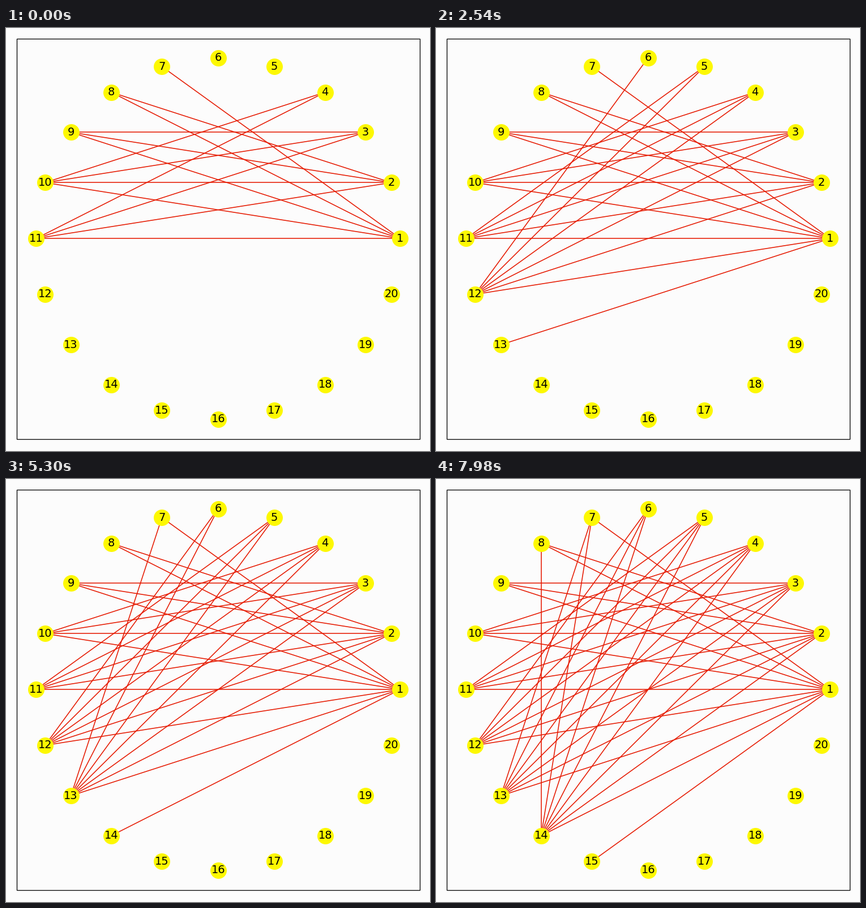
These frames come from a looping animation (749x748 px, 8 s). A matplotlib script:

```python
import numpy as np
import matplotlib.pyplot as plt
from matplotlib.animation import FuncAnimation
from matplotlib.collections import LineCollection
from matplotlib.patches import Rectangle

W, H, DPI = 749, 748, 100
PX = 72 / DPI                # points per pixel
CX, CY, RX, RY = 374.8, 372.2, 321.6, 319.7
NODES, GAP = 20, 6
START = 14                   # edges present at time zero
STEP, LEAD = 7.4, 4.6        # ticks per new edge, ticks already elapsed
TICK = 20
FRAMES = 400

BACK, YELLOW, RED = "#fcfcfc", "#fdf802", "#e61c04"

angle = 2 * np.pi * np.arange(NODES) / NODES
points = np.column_stack([CX + RX * np.cos(angle), CY - RY * np.sin(angle)])

# Join every pair at least GAP apart around the ring, row by row.
edges = [
    (points[i], points[j])
    for j in range(NODES)
    for i in range(j)
    if GAP <= j - i <= NODES - GAP
]

fig = plt.figure(figsize=(W / DPI, H / DPI), dpi=DPI, facecolor=BACK)
ax = fig.add_axes([0, 0, 1, 1])
ax.set_xlim(0, W)
ax.set_ylim(H, 0)
ax.axis("off")

ax.add_patch(Rectangle((18.5, 18.5), 712, 708, fill=False,
                       edgecolor="black", linewidth=1.3 * PX))
lines = LineCollection([], colors=RED, linewidths=1.6 * PX, zorder=2)
ax.add_collection(lines, autolim=False)
ax.scatter(points[:, 0], points[:, 1], s=(29 * PX) ** 2, c=YELLOW,
           linewidths=0, zorder=3)
for n, (x, y) in enumerate(points, 1):
    ax.text(x, y, str(n), fontsize=19.4 * PX, family="DejaVu Sans",
            ha="center", va="center", color="black", zorder=4)


def tick_at(frame):
    """Three ticks per 140 ms, lasting 20, 100 and 20 ms."""
    cycle, part = divmod(frame, 7)
    return 3 * cycle + (part > 0) + (part > 5)


def draw(frame):
    count = START + int((tick_at(frame) + LEAD) // STEP)
    lines.set_segments(edges[:count])
    return (lines,)


anim = FuncAnimation(fig, draw, frames=FRAMES, interval=TICK,
                     init_func=lambda: draw(0), repeat=True,
                     repeat_delay=0, blit=False)
plt.show()
```
